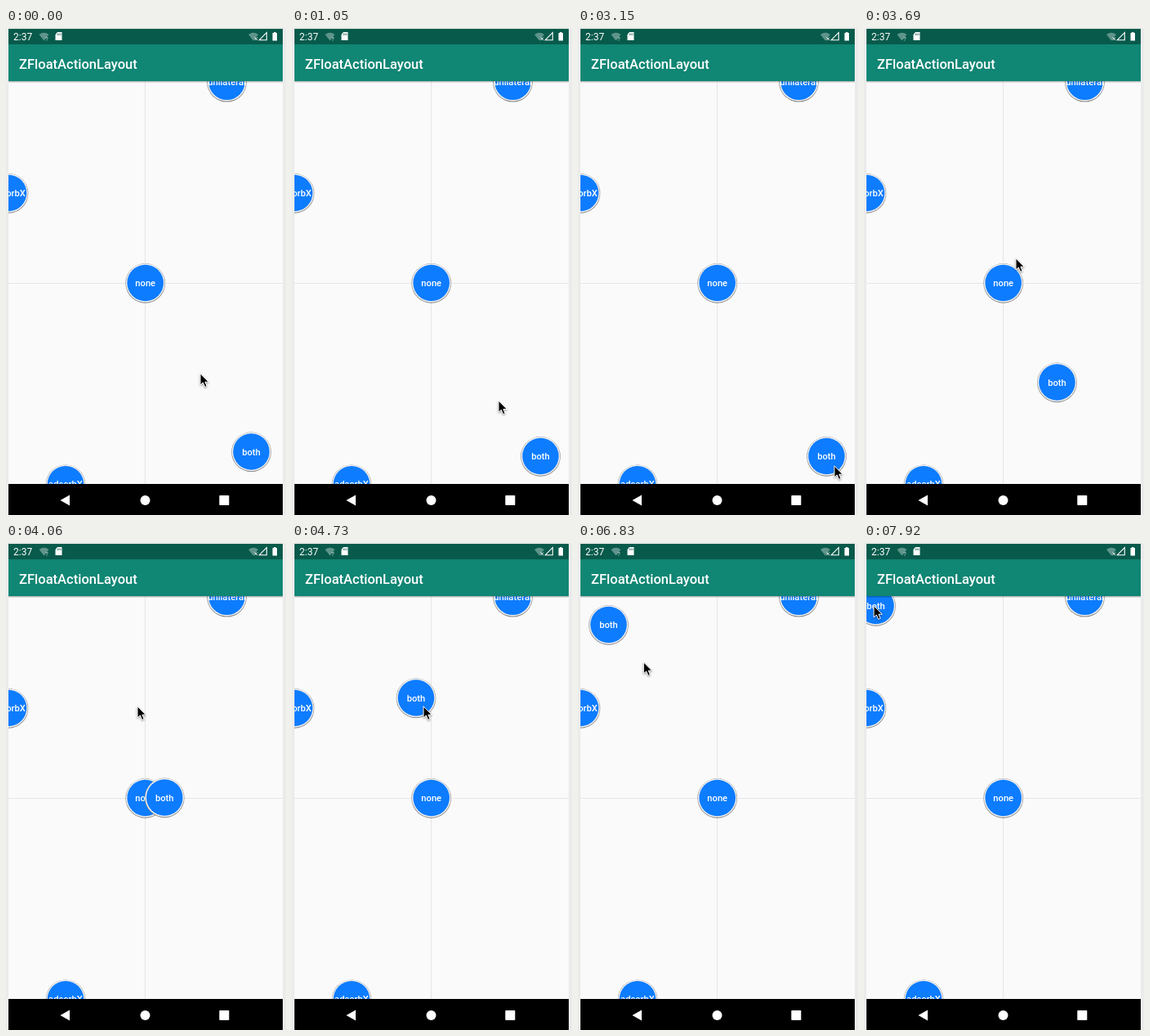
An HTML page for the animation above (8000 ms loop, 343x596 px).

```html
<!DOCTYPE html>
<html lang="en">
<head>
<meta charset="utf-8">
<title>Floating action layout</title>
<style>
  html, body { margin: 0; width: 100%; height: 100%; overflow: hidden; background: #ebebeb; }
  svg { display: block; width: 100%; height: 100%; }
  text { font-family: Roboto, sans-serif; fill: #fff; }
  .label { font-size: 11.2px; font-weight: 500; text-anchor: middle; }
  #cursor { filter: drop-shadow(0 1px 1px rgba(0, 0, 0, .4)); }
</style>
</head>
<body>
<svg viewBox="0 0 343 596">
  <defs>
    <clipPath id="content"><rect x="3" y="65" width="336" height="493"/></clipPath>
    <linearGradient id="barShadow" x2="0" y2="1">
      <stop stop-color="#000" stop-opacity=".3"/><stop offset="1" stop-color="#000" stop-opacity="0"/>
    </linearGradient>
    <g id="disc">
      <circle cy=".4" r="24.3" fill="#858585"/>
      <circle r="23.8" fill="#f0f0f0"/>
      <circle r="22.3" fill="#0d7cff"/>
    </g>
  </defs>

  <rect x="3" y="65" width="336" height="493" fill="#fafafa"/>
  <path d="M170.5 65V558M3 312.5H339" stroke="#e6e6e6"/>
  <g id="balls" clip-path="url(#content)"></g>
  <rect x="3" y="65" width="336" height="2.5" fill="url(#barShadow)"/>

  <!-- status and title bars -->
  <rect x="3" y="1" width="336" height="19" fill="#085a4b"/>
  <rect x="3" y="20" width="336" height="45" fill="#108674"/>
  <text x="9" y="15" font-size="12">2:37</text>
  <text x="16" y="49.5" font-size="16.5" font-weight="500">ZFloatActionLayout</text>
  <g fill="#fff">
    <path d="M40.500 8Q46.500 3.500 52.500 8L46.500 15.500ZM297 8Q303 3.500 309 8L303 15.500Z" opacity=".35"/>
    <text x="48" y="15.500" font-size="8" font-weight="500" opacity=".6">?</text>
    <path d="M63 5H68.500V15H60.500V8Z"/>
    <path d="M63.500 6.500V9M65.200 6.500V9M67 6.500V9" stroke="#085a4b" stroke-width=".7"/>
    <path d="M304.500 11.500L308 15M308 11.500L304.500 15" stroke="#fff"/>
    <path d="M319.300 5.700V14.700H310.300Z" fill="none" stroke="#fff" stroke-width="1.100"/>
    <path d="M326.500 6H328V5H330.500V6H332V15.500H326.500Z"/>
  </g>

  <!-- navigation bar -->
  <rect x="3" y="558" width="336" height="38"/>
  <g fill="#fff">
    <path d="M66.500 578L78 571.500V584.500Z"/>
    <circle cx="170.500" cy="578" r="6"/>
    <rect x="261.300" y="572" width="12" height="12" rx=".8"/>
  </g>

  <path id="cursor" d="M1 .8V15L4.300 12L6.700 17.400L9.100 16.400L6.900 11.200H11.300Z" stroke="#fff"/>
</svg>
<script>
const LOOP = 8000;
const TICK = 137.3;
const PHASE = 52;

// Where "both" rests beside a corner, and where it hides behind it.
const INSET = 34.5;
const hiddenBottom = [339, 558.5], hiddenTop = [3, 65.5];
const shownBottom = hiddenBottom.map(v => v - INSET);
const shownTop = hiddenTop.map(v => v + INSET);

const linear = p => p;
const easeOut = p => 1 - (1 - p) ** 2;

// Moves are listed as first tick, last tick, destination and easing.
const move = (from, to, point, ease = linear) => ({ from, to, point, ease });

const cursorMoves = [
  move(7, 10, [282, 522]),
  move(10, 13, [322, 550]),
  move(15, 17, [326, 550]),
  move(22, 23, [313, 535]),
  move(23, 25, [244, 445]),
  move(25, 27, [185, 281]),
  move(27, 28, [160, 199]),
  move(34, 38, [158, 212]),
  move(45, 47, [146, 213]),
  move(48, 51, [46, 111]),
  move(51, 53, [11, 76])
];
const ballMoves = [
  move(0, 2, shownBottom, easeOut),
  move(12, 15, hiddenBottom),
  move(18, 21, shownBottom),
  move(25, 27, [236.5, 433.5]),
  move(27, 31, [152, 189.5]),
  move(36, 41, shownTop, easeOut),
  move(52, 55, hiddenTop),
  move(57, 60, shownTop)
];

function positionAt(tick, start, moves) {
  let [x, y] = start;
  for (const { from, to, point, ease } of moves) {
    if (tick <= from) break;
    const p = ease(Math.min(1, (tick - from) / (to - from)));
    x += (point[0] - x) * p;
    y += (point[1] - y) * p;
  }
  return [x, y];
}

const place = (node, [x, y]) => node.setAttribute("transform", `translate(${x} ${y})`);

function addBall(label, x, y) {
  const group = document.createElementNS("http://www.w3.org/2000/svg", "g");
  group.innerHTML = `<use href="#disc"/><text class="label" y="4">${label}</text>`;
  place(group, [x, y]);
  document.getElementById("balls").append(group);
  return group;
}

addBall("unilateral", 270.5, 65.8);
addBall("adsorbX", 3, 202);
addBall("none", 170.7, 312);
addBall("adsorbX", 73, 558.3);
const both = addBall("both", 300.5, 518.5);
const cursor = document.getElementById("cursor");

function draw(now) {
  const tick = Math.floor((now % LOOP + PHASE) / TICK);
  place(both, positionAt(tick, [300.5, 518.5], ballMoves));
  place(cursor, positionAt(tick, [237, 422], cursorMoves));
  requestAnimationFrame(draw);
}
requestAnimationFrame(draw);
</script>
</body>
</html>
```
